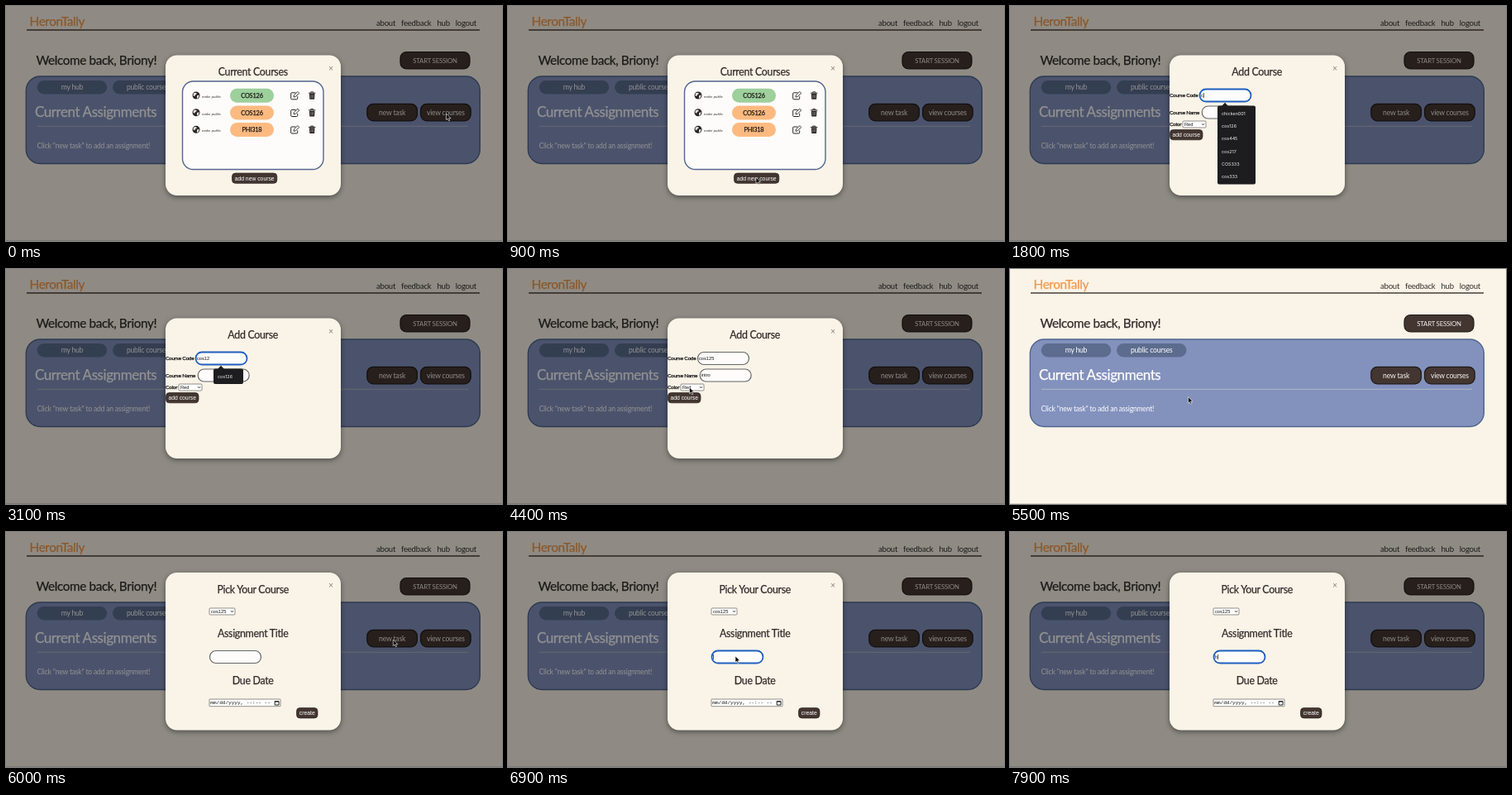
Animation of 600 by 284 pixels, one loop 8 s. Source, as an HTML page:

```html
<!DOCTYPE html>
<html lang="en">
<head>
<meta charset="utf-8">
<title>Study planner</title>
<style>
  html, body { margin: 0; width: 100%; height: 100%; overflow: hidden; background: #faf4e8; }
  svg { display: block; width: 600px; height: 284px; }
  text { font-family: Lato, "Open Sans", sans-serif; letter-spacing: -.025em; white-space: pre; }
  .ui { font-family: "Liberation Sans", Arial, sans-serif; letter-spacing: 0; }
  .mono { font-family: "Liberation Mono", monospace; letter-spacing: 0; }
  .list { font-family: Inter, sans-serif; letter-spacing: 0; }
  .medium { stroke: currentColor; stroke-width: .25px; }
  .mid { text-anchor: middle; }
  .modal { filter: drop-shadow(0 2px 3px rgba(0, 0, 0, .45)); }
</style>
</head>
<body>
<svg id="stage" viewBox="0 0 600 284" xmlns="http://www.w3.org/2000/svg"></svg>
<script>
const INK = '#332b29', DARK = '#433631', CREAM = '#faf4e8', BLUE = '#1f5fbf';
const LOOP = 8000, STEP = 100;

// Markup helpers
const text = (x, y, size, str, fill = INK, cls = '', id = '') =>
  `<text id="${id}" x="${x}" y="${y}" font-size="${size}" fill="${fill}" color="${fill}" class="${cls}">${str}</text>`;
const box = (x, y, w, h, r, fill, stroke = 'none', sw = 1, extra = '') =>
  `<rect x="${x}" y="${y}" width="${w}" height="${h}" rx="${r}" fill="${fill}" stroke="${stroke}" stroke-width="${sw}" ${extra}/>`;
const rule = (x1, x2, y, color, w = 1) =>
  `<path d="M${x1} ${y}H${x2}" stroke="${color}" stroke-width="${w}"/>`;
const group = (id, body) => `<g id="${id}">${body}</g>`;

const pageButton = (x, y, w, label, size) =>
  box(x, y, w, 20.5, 7.5, DARK, '#1f1917', 1.2) + text(x + w / 2, y + 13.4, size, label, '#f6f1ec', 'mid');
const pill = (x, label) =>
  box(x, 90, 84.5, 16.5, 8.2, '#5c6c8e') + text(x + 42.2, 101.3, 8.6, label, '#fff', 'mid');
const smallButton = (x, y, w, label) =>
  box(x, y, w, 12.3, 4, DARK, '#2b221f', .7) + text(x + w / 2, y + 8.5, 6.8, label, '#fff', 'ui mid');
const modal = (y, h) => box(193, y, 212, h, 14, CREAM, 'none', 0, 'class="modal"');
const heading = (y, str) => text(298.7, y, 12.4, str, INK, 'mid medium');
const cross = y => text(393, y, 10.5, '×', '#8a857e', 'ui mid');
const select = (x, y, w, label) =>
  box(x, y, w, 8, 1, '#fff', '#77736f', .8) + text(x + 2, y + 6, 5.7, label, '#111', 'ui') +
  `<path d="M${x + w - 5} ${y + 3}l1.5 2 1.5-2" fill="none" stroke="#333" stroke-width=".8"/>`;
const field = (id, x, y) =>
  box(x + .5, y + .5, 62, 15, 7.5, '#fdfcfb', '#666', 1.2, `id="${id}Box"`) +
  text(x + 2, y + 9.9, 5.7, '', '#111', 'ui', id + 'Text') +
  `<path id="${id}Caret" stroke="#111" stroke-width=".7"/>`;

function courseRow(y, code, color) {
  const globe = `<circle cx="230" cy="${y - .3}" r="4.5" fill="#2a2524"/>
    <path d="M227 ${y - 3}l3-.6 .8 1.6-2 1.2-.4 1.5-2-.6zM231 ${y}l2.6-.8-.6 3-2 1.5z" fill="#e8e5e1"/>`;
  const edit = `<path d="M350.5 ${y - 3.5}h-4.8q-1 0-1 1v6q0 1 1 1h6q1 0 1-1v-2.6" fill="none" stroke="#2a2524" stroke-width="1"/>
    <path d="M348 ${y + 1.8}l.4-2.3 4.4-4.4 1.9 1.9-4.4 4.4z" fill="#fdfcfb" stroke="#2a2524" stroke-width=".9"/>`;
  const bin = `<path d="M366 ${y - 3.1}h8.4M368.6 ${y - 3.4}v-1h3.2v1" fill="none" stroke="#2a2524" stroke-width="1"/>
    <path d="M366.9 ${y - 2.2}h6.6l-.4 6.7h-5.8z" fill="#2a2524"/>
    <path d="M368.7 ${y - 1}v4M370.2 ${y - 1}v4M371.7 ${y - 1}v4" stroke="#bbb7b3" stroke-width=".5"/>`;
  return globe + `<g font-style="italic">${text(237, y + 2.8, 4.3, 'make public', '#333', 'ui')}</g>` +
    box(271, y - 8.6, 53, 17, 8.5, color) + text(297.5, y + 2.6, 7.4, code, '#1b1716', 'mid medium') + edit + bin;
}

const page =
  box(0, 0, 600, 284, 0, CREAM) + rule(0, 600, 283.5, '#d8d4cc') +
  text(28.5, 24.3, 15.4, 'HeronTally', '#f3994a', 'medium') +
  [['about', 448], ['feedback', 478], ['hub', 521.5], ['logout', 543.7]].map(([s, x]) => text(x, 24.2, 9.6, s)).join('') +
  rule(25, 573, 29, '#4a3d38', 1.3) +
  text(36.5, 71, 15.3, 'Welcome back, Briony!', INK, 'medium') +
  pageButton(477, 55.5, 84, 'START SESSION', 7.8) +
  box(24.3, 85, 549, 105.5, 17, '#8391bd', '#50658f', 1.4) +
  pill(37.7, 'my hub') + pill(129, 'public courses') +
  text(35, 134.3, 17, 'Current Assignments', '#fff', 'medium') +
  pageButton(436.8, 118.3, 60.6, 'new task', 8.7) + pageButton(501.6, 118.3, 60.6, 'view courses', 8.6) +
  rule(38, 559, 145.3, '#b9bdcb', .9) +
  text(37.5, 172.2, 8.6, 'Click "new task" to add an assignment!', '#fff');

const courses =
  modal(59.5, 169.5) + heading(84, 'Current Courses') + cross(78.5) +
  box(213.5, 91, 170.5, 106.5, 13, '#fdfcfb', '#54668f', 1.4) +
  courseRow(108.3, 'COS126', '#9dd09b') + courseRow(129, 'COS126', '#fdba80') + courseRow(149.5, 'PHI318', '#fdba80') +
  smallButton(273.5, 202, 54.3, 'add new course');

const addCourse =
  modal(59.5, 169.5) + heading(84, 'Add Course') + cross(78.5) +
  text(193, 110.2, 6.4, 'Course Code', '#111', 'medium') + field('code', 229, 100) +
  text(193, 130.5, 6.4, 'Course Name', '#111', 'medium') + field('name', 231.7, 120.5) +
  text(193, 145.3, 6.4, 'Color', '#111', 'medium') + select(209, 139, 28, 'Red') +
  smallButton(193.5, 149.5, 39.5, 'add course') + group('hints', '');

const newTask =
  modal(49, 190.5) + heading(73.8, 'Pick Your Course') + cross(67.8) +
  select(246, 92, 31, 'cos125') +
  heading(127, 'Assignment Title') + field('title', 246, 143) +
  heading(183.8, 'Due Date') +
  box(246, 202, 86, 8.7, .5, '#fff', '#77736f', .8) + text(247.3, 208.4, 6.05, 'mm/dd/yyyy, --:-- --', '#111', 'mono') +
  '<path d="M325.2 204.6h4.8v4.4h-4.8zM325.2 205h4.8" fill="none" stroke="#111" stroke-width=".9"/>' +
  smallButton(351.5, 212.6, 25.5, 'create');

const arrow = '<path d="M0 0V7.6L1.8 6 3 8.8 4.3 8.2 3.1 5.6H5.5Z" fill="#000" stroke="#fff" stroke-width=".6"/>';

const stage = document.getElementById('stage');
stage.innerHTML = page + group('dim', box(0, 0, 600, 284, 0, '#000', 'none', 0, 'opacity=".43"')) +
  group('courses', courses) + group('addCourse', addCourse) + group('newTask', newTask) + group('cursor', arrow);
const $ = id => document.getElementById(id);
const show = (id, on) => $(id).setAttribute('display', on ? 'inline' : 'none');

// Pointer stops: time, x, y
const path = [
  [0, 532.5, 130], [200, 532.5, 130], [700, 300, 207], [1000, 300, 207], [1400, 262, 107], [4000, 262, 107],
  [4400, 219.5, 143], [4600, 219.5, 143], [4900, 215.5, 154.5], [5500, 215.5, 154.5],
  [5800, 468.3, 130], [6000, 468.3, 130], [6400, 275, 150], [LOOP, 275, 150]
];

// Typed text: key times, focus span and caret geometry
const fields = {
  code: { x: 231, y: 110, str: 'cos125', keys: [1700, 2000, 2200, 2400, 2600, 3300], from: 1500, to: 3500 },
  name: { x: 233.7, y: 130.5, str: 'intro', keys: [3700, 3800, 3900, 4000, 4100], from: 3500, to: 4400 },
  title: { x: 248, y: 153, str: 'h', keys: [7700], from: 6800, to: LOOP }
};
const hintWords = ['chicken001', 'cos126', 'cos445', 'cos217', 'COS333', 'cos333'];

const within = (t, a, b) => t >= a && t < b;

function pointer(t) {
  const i = path.findIndex((p, k) => k && t <= p[0]);
  const [t0, x0, y0] = path[i - 1], [t1, x1, y1] = path[i];
  const u = (t - t0) / (t1 - t0), e = u * u * (3 - 2 * u);
  return [x0 + (x1 - x0) * e, y0 + (y1 - y0) * e];
}

function drawField(id, t) {
  const f = fields[id], pressed = f.keys.filter(k => k <= t);
  const typed = f.str.slice(0, pressed.length), node = $(id + 'Text');
  const focus = within(t, f.from, f.to);
  node.textContent = typed;
  $(id + 'Box').setAttribute('stroke', focus ? BLUE : '#666');
  $(id + 'Box').setAttribute('stroke-width', focus ? 1.8 : 1.2);
  const since = t - Math.max(f.from, ...pressed);
  const x = f.x + (typed ? node.getComputedTextLength() : 0) + .5;
  $(id + 'Caret').setAttribute('d', `M${x} ${f.y - 5}v6.2`);
  show(id + 'Caret', focus && since % 1000 < 500);
  return typed;
}

function drawHints(prefix) {
  const words = prefix ? hintWords.filter(w => w.toLowerCase().startsWith(prefix)) : [];
  if (!words.length) { $('hints').innerHTML = ''; return; }
  const w = words.includes('chicken001') ? 46 : 36, h = 18.5 + 15.3 * (words.length - 1);
  $('hints').innerHTML = '<path d="M256 121l4-4.2 4 4.2z" fill="#1d1c1e"/>' +
    box(251, 120.5, w, h, 2, '#1d1c1e') +
    words.map((s, i) => text(256, 131.7 + 15.3 * i, 5.4, s, '#f2f2f2', 'list')).join('');
}

function draw(t) {
  show('courses', t < 1000);
  show('addCourse', within(t, 1000, 5500));
  show('newTask', t >= 5900);
  show('dim', !within(t, 5500, 5900));
  drawHints(drawField('code', t));
  drawField('name', t);
  drawField('title', t);
  const [x, y] = pointer(t);
  $('cursor').setAttribute('transform', `translate(${x} ${y})`);
  show('cursor', !within(t, 1700, 4100) && t < 7700);
}

const start = performance.now();
function tick() {
  const t = (performance.now() - start) % LOOP;
  draw(Math.floor(t / STEP) * STEP);
  requestAnimationFrame(tick);
}
draw(0);
requestAnimationFrame(tick);
</script>
</body>
</html>
```
